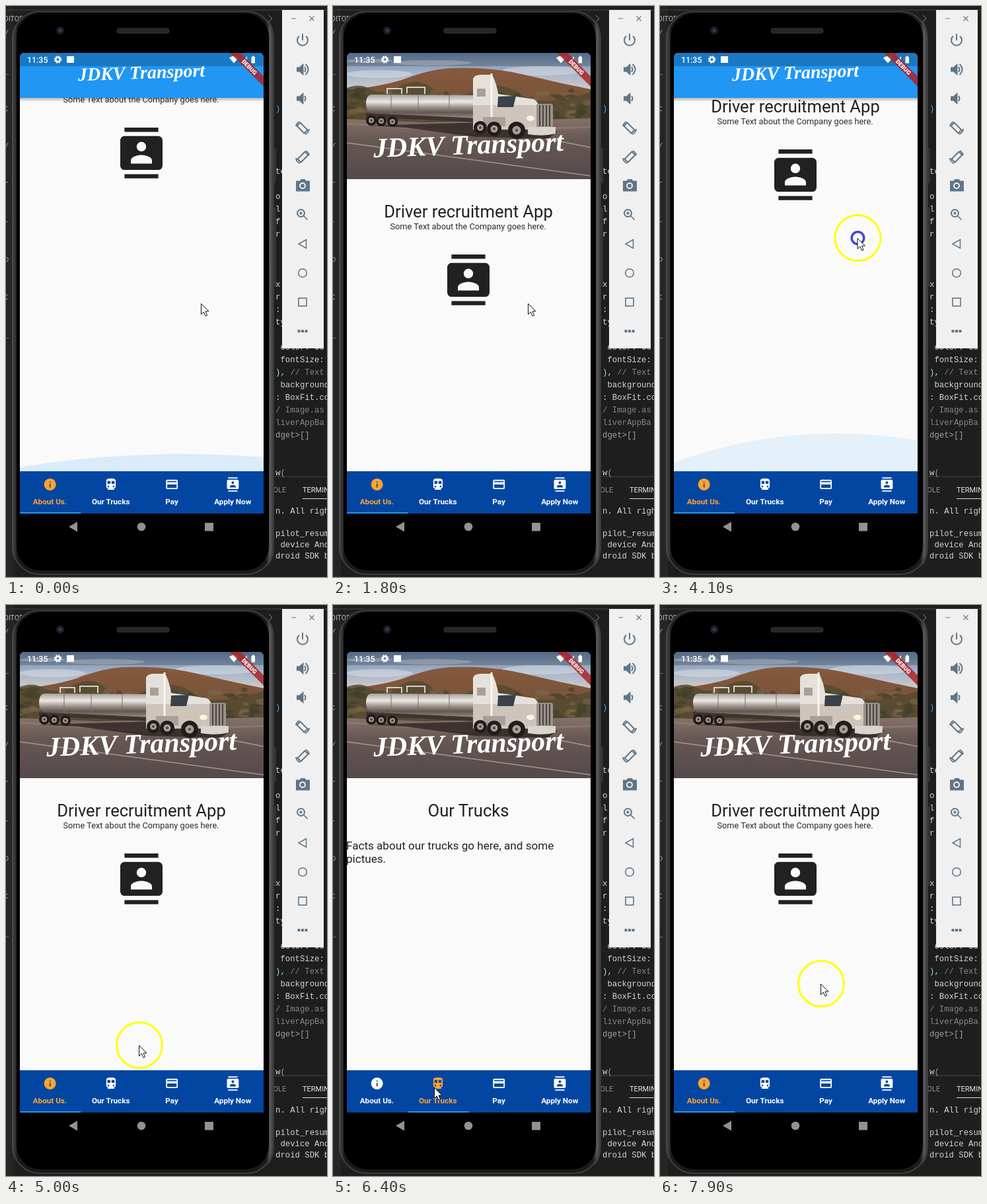
These frames come from a looping animation (486x864 px, 8 s). An HTML page:

```html
<!DOCTYPE html>
<html lang="en">
<head>
<meta charset="utf-8">
<title>Driver recruitment app</title>
<style>
html, body { margin: 0; width: 100%; height: 100%; overflow: hidden; background: #1e1e1e; }
svg { display: block; width: 486px; height: 864px; }
text { font-family: Roboto, sans-serif; white-space: pre; }
.mono text { font: 12.3px "Liberation Mono", monospace; }
.mid { text-anchor: middle; }
.h1 { font-size: 25.6px; fill: #212121; }
.sub { font-size: 12.75px; fill: #2b2b2b; }
.fact { font-size: 17.1px; fill: #212121; }
.tab text { font-size: 11.7px; font-weight: 700; }
.logo { font: italic 700 28px "Liberation Serif", serif; fill: #fff; }
.line { fill: none; stroke: #5f7688; stroke-width: 2; }
</style>
</head>
<body>
<svg viewBox="0 0 486 864" xmlns="http://www.w3.org/2000/svg">
  <defs>
    <linearGradient id="sky" x2="0" y2="1">
      <stop stop-color="#6885ac"/><stop offset=".55" stop-color="#a9b7ca"/><stop offset="1" stop-color="#d6cfc8"/>
    </linearGradient>
    <linearGradient id="hill" x2="0" y2="1">
      <stop stop-color="#87593c"/><stop offset="1" stop-color="#6a5038"/>
    </linearGradient>
    <linearGradient id="road" x2="0" y2="1">
      <stop stop-color="#85716a"/><stop offset=".35" stop-color="#675854"/><stop offset="1" stop-color="#54484a"/>
    </linearGradient>
    <linearGradient id="steel" x2="0" y2="1">
      <stop stop-color="#a5a09c"/><stop offset=".3" stop-color="#ece8e4"/><stop offset=".52" stop-color="#a19690"/>
      <stop offset=".75" stop-color="#64564f"/><stop offset="1" stop-color="#998f88"/>
    </linearGradient>
    <linearGradient id="shade" x2="0" y2="1">
      <stop stop-color="#000" stop-opacity=".28"/><stop offset="1" stop-color="#000" stop-opacity="0"/>
    </linearGradient>
    <linearGradient id="rim">
      <stop stop-color="#555"/><stop offset=".02" stop-color="#1a1a1a"/><stop offset=".97" stop-color="#1a1a1a"/>
      <stop offset=".985" stop-color="#5a5a5a"/><stop offset="1" stop-color="#333"/>
    </linearGradient>
    <clipPath id="screen"><path d="M21 768V79q0-8 8-8H382q8 0 8 8V768z"/></clipPath>
    <clipPath id="body"><rect x="21" y="71" width="369" height="633"/></clipPath>
    <clipPath id="bar"><rect id="barClip" x="21" y="71" width="369" height="191"/></clipPath>
  </defs>

  <rect width="486" height="864" fill="#1e1e1e"/>
  <rect width="12" height="864" fill="#252526"/>
  <path d="M0 6H486" stroke="#333" stroke-width="2"/>
  <path d="M406 712H486" stroke="#444"/>
  <g id="editor" class="mono" fill="#d4d4d4"></g>
  <text x="-3" y="23" font-size="10.5" fill="#bbb">DITOR</text>
  <path d="M398 14l5 5-5 5" fill="none" stroke="#888"/>
  <text x="398" y="736" font-size="11" fill="#8d8d8d">SOLE</text>
  <text x="449" y="736" font-size="11" fill="#e7e7e7">TERMINAL</text>
  <path d="M449 745.500H486" stroke="#ddd"/>

  <!-- phone shell -->
  <path d="M405 215h4v53h-4zM405 305h4v120h-4z" fill="#333"/>
  <rect x="9" y="6" width="397" height="856" rx="42" fill="url(#rim)"/>
  <rect x="11" y="8" width="393" height="852" rx="40" fill="none" stroke="#3f3f3f" stroke-width="2"/>
  <rect x="16" y="11" width="382" height="843" rx="36" fill="#000"/>
  <rect x="168" y="34" width="79" height="7" rx="3" fill="#262626" stroke="#363636"/>
  <circle cx="82" cy="37" r="6" fill="#1c1e24"/><circle cx="82" cy="37" r="2.500" fill="#34405a"/>
  <g fill="#929292"><path d="M95 788L108 780.500V795.500z"/><circle cx="205" cy="788" r="6.300"/><rect x="301" y="782" width="13" height="12.500"/></g>

  <g clip-path="url(#screen)">
    <rect x="21" y="71" width="369" height="697" fill="#fafafa"/>
    <g clip-path="url(#body)">
      <g id="pages">
        <g>
          <text class="h1 mid" x="205" y="320">Driver recruitment App</text>
          <text class="sub mid" x="204.500" y="338">Some Text about the Company goes here.</text>
          <path id="bigIcon" fill="#212121" transform="translate(166.600 376) scale(3.2)"/>
        </g>
        <g transform="translate(369)">
          <text class="h1 mid" x="205" y="320">Our Trucks</text>
          <text class="fact" x="20" y="370">Facts about our trucks go here, and some</text>
          <text class="fact" x="20" y="389.500">pictues.</text>
        </g>
        <text class="h1 mid" x="943" y="320">Pay</text>
        <text class="h1 mid" x="1312" y="320">Apply Now</text>
      </g>
      <ellipse id="glow" cx="268" rx="553" fill="#2196f3"/>
    </g>

    <rect id="barShadow" x="21" width="369" height="6" fill="url(#shade)"/>
    <g clip-path="url(#bar)">
      <rect x="21" y="71" width="369" height="191" fill="#2196f3"/>
      <g id="photo">
        <rect x="21" y="71" width="369" height="60" fill="url(#sky)"/>
        <g fill="#dfe1e6" opacity=".5">
          <ellipse cx="70" cy="103" rx="50" ry="6"/><ellipse cx="150" cy="86" rx="60" ry="4"/>
          <ellipse cx="318" cy="98" rx="62" ry="7"/><ellipse cx="55" cy="83" rx="35" ry="3"/>
        </g>
        <path d="M21 127Q70 122 104 112Q150 94 184 94Q240 92 290 104Q340 116 390 126V185H21z" fill="url(#hill)"/>
        <path d="M21 124q20-8 37 2t45-5 50 6 60 2 70 4 107-3v50H21z" fill="#554b31" opacity=".85"/>
        <g id="brush"></g>
        <path d="M21 171L140 176 390 170V262H21z" fill="url(#road)"/>
        <path d="M21 178L200 190 390 183" fill="none" stroke="#97806f" stroke-width="3" opacity=".6"/>
        <path d="M335 203L390 214M21 207L390 257" stroke="#c5b6a8" stroke-width="1.500" opacity=".7"/>
        <path d="M50 181L110 184 215 198 325 201 340 190 230 176z" fill="#29211f" opacity=".75"/>
        <path d="M82 133v-8h22v8M112 132v-9h27v10" fill="none" stroke="#d4d1cd" stroke-width="2"/>
        <path d="M58 134Q50 135 50 148T59 163L216 170Q238 170 238 150T220 135z" fill="url(#steel)"/>
        <path d="M88 134v31M129 134v33M176 134v35" stroke="#77706b"/>
        <path d="M50 165L240 174" stroke="#3d3431" stroke-width="6"/>
        <path d="M212 180V110Q214 104 224 104H241Q248 118 250 133L304 141Q311 144 312 157V187H212z" fill="#e6e0da"/>
        <path d="M212 150H312V187H212z" fill="#cfc4bb"/>
        <path d="M250 137L277 136 273 153H249z" fill="#39424b"/>
        <path d="M240 102V169" stroke="#f7f5f2" stroke-width="3"/>
        <path d="M218 125h13v12h-13zM227 168h34v14h-34z" fill="#a99f99"/>
        <rect x="308" y="148" width="25" height="36" rx="3" fill="#9a918a"/>
        <path d="M313 150v32M318 150v32M323 150v32M328 150v32" stroke="#4a4340" stroke-width="2"/>
        <path d="M295 183H337V193Q318 198 295 194z" fill="#dad4ce"/>
        <ellipse cx="299" cy="170" rx="6" ry="4" fill="#fff5df"/>
        <g id="wheels"></g>
      </g>
      <g id="title"><text class="logo mid" y="8" transform="rotate(-2)">JDKV Transport</text></g>
    </g>

    <rect x="21" y="71" width="369" height="20" fill="#000" opacity=".2"/>
    <g fill="#fff">
      <text x="32" y="85.500" font-size="12.400" font-weight="500">11:35</text>
      <circle cx="78.500" cy="81" r="3.300" fill="none" stroke="#fff" stroke-width="2.500"/>
      <circle cx="78.500" cy="81" r="5" fill="none" stroke="#fff" stroke-width="1.600" stroke-dasharray="2.100 1.827"/>
      <rect x="92" y="76" width="11" height="10"/>
      <path d="M338 78.500Q345 73 352 78.500L345 86.500z"/>
      <path d="M355 86L365 76V86z" opacity=".8"/>
    </g>
    <g transform="translate(368.500 92.500) rotate(45)">
      <rect x="-40" y="-5.500" width="80" height="11" fill="#ad252b" opacity=".86"/>
      <text class="mid" y="3.200" font-size="8.800" font-weight="900" fill="#fff">DEBUG</text>
    </g>
    <path d="M371.500 77H373V75.500H375.500V77H377V86.500H371.500z" fill="#fff"/>

    <rect x="21" y="704" width="369" height="64" fill="#0346a2"/>
    <g id="tabs"></g>
    <rect id="marker" x="21" y="766" width="92.250" height="2" fill="#2196f3"/>
  </g>

  <!-- emulator controls -->
  <rect x="418" y="6" width="63" height="512" fill="#f0f0f0"/>
  <path d="M432 19h7M459.500 15.500l7 7m0-7l-7 7" fill="none" stroke="#777" stroke-width="1.200"/>
  <g id="controls" class="line">
    <path d="M444 45.500a8 8 0 1 0 10 0M449 42v10"/>
    <g id="speaker"><path d="M441 93.500h3.500l5-4.500v14l-5-4.500H441z" fill="#5f7688"/><path d="M452 92q3 4 0 8"/></g>
    <use href="#speaker" y="44"/><path d="M453.500 88q8 8 0 16"/>
    <g id="rotate"><path d="M445.500 176.500l11 11-5 5-11-11zM439 182a10 10 0 0 1 5-7M459 186a10 10 0 0 1-6 8"/></g>
    <use href="#rotate" transform="matrix(-1 0 0 1 898 44)"/>
    <path d="M440 265.500h5l2-2.500h5l2 2.500h5v14h-19z" fill="#5f7688"/>
    <circle cx="449" cy="272" r="4" stroke="#f0f0f0"/>
    <circle cx="446.500" cy="313.500" r="5.500"/><path d="M450.500 317.500l6 6M444 313.500h5M446.500 311v5" stroke-width="1.700"/>
    <path d="M443 360l11.500-6.500v13z" stroke-width="1.500"/>
    <circle cx="449" cy="404" r="6.300" stroke-width="1.600"/>
    <rect x="443" y="442" width="12" height="12" stroke-width="1.600"/>
    <path d="M441.500 492h4m1.500 0h4m1.500 0h4" stroke-width="4"/>
  </g>

  <g id="pointer">
    <g id="halo" fill="none">
      <circle cx="1" r="34.500" stroke="#ffff08" stroke-width="3"/>
      <circle id="press" cx="1" r="9.300" stroke="#4345dc" stroke-width="3.500"/>
    </g>
    <path d="M.5.5V16.500L4.300 13 7 19 9.500 18 7 12H12z" fill="#fff" stroke="#111"/>
  </g>
</svg>

<script>
const LOOP = 8000, STEP = 100, TAB = 92.25, PAGE = 369, COLLAPSE = 123;
const $ = id => document.getElementById(id);
const clamp = (v, lo, hi) => Math.min(hi, Math.max(lo, v));
const set = (id, attrs) => { for (const k in attrs) $(id).setAttribute(k, attrs[k]); };

// Tracks hold rows of [time, value, ...].
const tracks = {
  scroll: [[0, 192], [1100, 192], [1200, 161], [1400, 161], [1800, 0], [2600, 0], [2900, 115], [3200, 0],
    [3300, 19], [3600, 155], [3700, 192], [3920, 192], [4100, 159], [4500, 0]],
  pointer: [[0, 295, 450], [2100, 295, 450], [2400, 318, 562], [2600, 320, 535], [2900, 322, 420],
    [3200, 320, 535], [3300, 319, 517], [3600, 310, 380], [3850, 300, 300], [3900, 299, 300], [4100, 298.500, 351],
    [4500, 270, 520], [4700, 250, 565], [5000, 201, 666], [5500, 153, 730], [6500, 153, 730], [6700, 251, 735],
    [6800, 251, 735], [7000, 344, 735], [7100, 344, 735], [7400, 66, 735], [7600, 66, 735], [7900, 243, 573]],
  glow: [[0, 26, .15], [400, 0, 0], [3700, 0, 0], [3900, 60, .17], [4100, 57, .1], [4500, 0, 0]],
};
const slides = [[5700, 0, 1], [6700, 1, 2], [7020, 2, 3], [7400, 3, 0]];
const presses = [[2600, 4600], [5600, 5800], [6700, 6800], [7000, 7100], [7400, 7500]];
const moving = [[2200, 6200], [6600, LOOP]];

function sample(track, t) {
  const i = track.findIndex(row => row[0] > t);
  if (i < 0) return track[track.length - 1].slice(1);
  const a = track[i - 1], b = track[i], f = (t - a[0]) / (b[0] - a[0]);
  return a.slice(1).map((v, n) => v + (b[n + 1] - v) * f);
}
const during = (spans, t) => spans.some(([a, b]) => t >= a && t < b);
function tabAt(t) {
  let tab = 0;
  for (const [start, from, to] of slides) if (t >= start) {
    const f = clamp((t - start) / 300, 0, 1);
    tab = from + (to - from) * f * f * (3 - 2 * f);
  }
  return tab;
}

const icons = {
  info: "M12 2C6.48 2 2 6.48 2 12s4.48 10 10 10 10-4.48 10-10S17.52 2 12 2zm1 15h-2v-6h2v6zm0-8h-2V7h2v2z",
  train: "M12 2c-4 0-8 .5-8 4v9.5C4 17.43 5.57 19 7.5 19L6 20.5v.5h12v-.5L16.5 19c1.93 0 3.5-1.57 3.5-3.5V6c0-3.5-3.58-4-8-4zM7.5 17a1.5 1.5 0 1 1 0-3 1.5 1.5 0 0 1 0 3zm3.5-6H6V6h5zm5.5 6a1.5 1.5 0 1 1 0-3 1.5 1.5 0 0 1 0 3zm1.5-6h-5V6h5z",
  card: "M20 4H4a2 2 0 0 0-2 2v12a2 2 0 0 0 2 2h16a2 2 0 0 0 2-2V6a2 2 0 0 0-2-2zm0 14H4v-6h16zm0-10H4V6h16z",
  contacts: "M20 0H4v2h16zM4 24h16v-2H4zM20 4H4a2 2 0 0 0-2 2v12a2 2 0 0 0 2 2h16a2 2 0 0 0 2-2V6a2 2 0 0 0-2-2zm-8 2.75a2.25 2.25 0 1 1 0 4.5 2.25 2.25 0 0 1 0-4.5zM17 17H7v-1.5c0-1.67 3.33-2.5 5-2.5s5 .83 5 2.5z",
};
const labels = [["About Us.", "info"], ["Our Trucks", "train"], ["Pay", "card"], ["Apply Now", "contacts"]];
$("tabs").innerHTML = labels.map(([label, icon], i) => {
  const x = 66.5 + i * TAB;
  return `<g class="tab"><path fill-rule="evenodd" d="${icons[icon]}" transform="translate(${x - 10.5} 713.3) scale(.89)"/>
    <text class="mid" x="${x}" y="754">${label}</text></g>`;
}).join("");
set("bigIcon", { d: icons.contacts, "fill-rule": "evenodd" });

const code = [
  [159, ")", "#4fa6e8"], [254, "te"], [292, "o"], [311, "l"], [330, "f"], [349, "r"], [425, "x"], [444, "r"],
  [463, ": 5"], [482, "ty"], [520, " color: Co"], [539, " fontSize:"], [558, "),", "#9cdcfe"],
  [558, "   // Text", "#858585"], [577, " background"], [596, ": BoxFit.co"], [615, "/ Image.as", "#858585"],
  [634, "liverAppBa", "#858585"], [653, "dget>[]", "#a0a0a0"], [710, "w"], [710, " (", "#c586c0"],
  [768, "n. All righ"], [802, "pilot_resum"], [819, " device And"], [836, "droid SDK b"],
];
$("editor").innerHTML = code.map(([y, s, color = "#d4d4d4"]) => `<text x="408" y="${y}" fill="${color}">${s}</text>`).join("")
  + [..."/_t/r-ot_"].map((c, i) => `<text x="-3" y="${45 + i * 57}" fill="#999">${c}</text>`).join("");

let seed = 7;
const random = () => (seed = seed * 16807 % 2147483647) / 2147483647;
$("brush").innerHTML = Array.from({ length: 90 }, () => {
  const x = 21 + random() * 369, y = 128 + random() * 42;
  return `<ellipse cx="${x}" cy="${y}" rx="${4 + random() * 7}" ry="${2 + random() * 3}"
    fill="${random() < .5 ? "#3d4028" : "#79664a"}" opacity=".6"/>`;
}).join("");
$("wheels").innerHTML = [[58, 173, 8], [73, 174, 8], [90, 175, 8], [223, 184, 10], [244, 186, 11], [278, 188, 13]]
  .map(([x, y, r]) => `<circle cx="${x}" cy="${y}" r="${r}" fill="#211c1b"/>
    <circle cx="${x}" cy="${y}" r="${r * .5}" fill="#a79d96"/><circle cx="${x}" cy="${y}" r="2" fill="#4c4542"/>`).join("");

function draw(t) {
  const [scroll] = sample(tracks.scroll, t);
  const folded = clamp(scroll / COLLAPSE, 0, 1);
  const bottom = 262 - folded * COLLAPSE;
  const scale = 1.5 - folded * .5;
  const tab = tabAt(t);

  set("pages", { transform: `translate(${-tab * PAGE} ${-scroll})` });
  set("barClip", { height: bottom - 71 });
  set("barShadow", { y: bottom, opacity: scroll > COLLAPSE ? 1 : 0 });
  set("photo", { transform: `translate(0 ${-folded * COLLAPSE / 4})`, opacity: clamp((1 - folded) / .41, 0, 1) });
  set("title", { transform: `translate(205 ${bottom - 11 - 26 * scale}) scale(${scale})` });

  const [height, alpha] = sample(tracks.glow, t);
  const ry = height * 7.3;
  set("glow", { cy: 704 - height + ry, ry, opacity: alpha });

  set("marker", { x: 21 + tab * TAB });
  [...$("tabs").children].forEach((el, i) => el.setAttribute("fill", i === Math.round(tab) ? "#ffa42e" : "#fff"));

  const [x, y] = sample(tracks.pointer, t);
  set("pointer", { transform: `translate(${x} ${y})` });
  set("halo", { opacity: during(moving, t) ? 1 : 0 });
  set("press", { opacity: during(presses, t) ? 1 : 0 });
}

const start = performance.now();
function tick(now) {
  const t = Math.max(0, now - start) % LOOP;
  draw(Math.floor(t / STEP) * STEP);
  requestAnimationFrame(tick);
}
draw(0);
requestAnimationFrame(tick);
</script>
</body>
</html>
```
